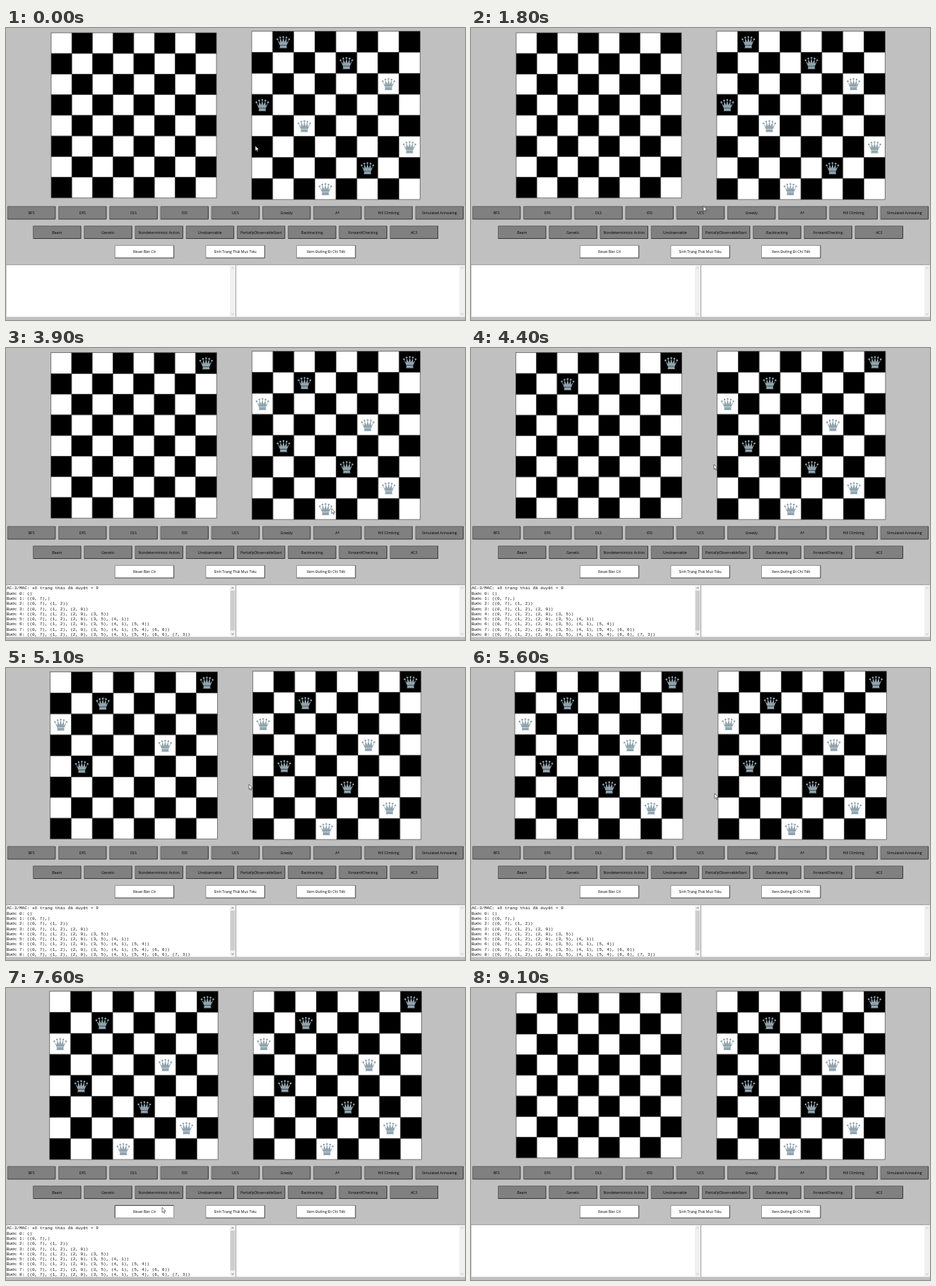
An HTML page that plays this animation: 650x414 px, repeating every 9200 ms.

```html
<!DOCTYPE html>
<html lang="vi">
<head>
<meta charset="utf-8">
<title>8 quân hậu</title>
<style>
  html, body { margin: 0; width: 100%; height: 100%; overflow: hidden; background: #c0c0c0; }
  svg { display: block; width: 100vw; height: 100vh; }
  .label { font: 5.2px "Open Sans", "Noto Sans", sans-serif; text-anchor: middle; fill: #000; }
  .log { font: 6.02px "Liberation Mono", "Courier New", monospace; fill: #111; white-space: pre; }
</style>
</head>
<body>
<svg id="stage" viewBox="0 0 650 414">
  <defs>
    <g id="queen" fill="#90a4ae">
      <path d="M-8.3-3.6-5.1 4H5.1L8.3-3.6 4.9.8 4.3-6 1.7.2 0-7 -1.7.2 -4.3-6 -4.9.8Z"/>
      <path d="M-5.2 4.5H5.2L4.5 6.4 5.4 8.4H-5.4L-4.5 6.4Z"/>
      <circle cx="-8.2" cy="-4" r="1.3"/><circle cx="-4.4" cy="-6.5" r="1.3"/>
      <circle cy="-7.3" r="1.3"/>
      <circle cx="4.4" cy="-6.5" r="1.3"/><circle cx="8.2" cy="-4" r="1.3"/>
    </g>
  </defs>
</svg>
<script>
const LOOP = 9200, TICK = 100;
const EMPTY = 29.25, FILLED = 29.8;
const FIRST = [1, 4, 6, 0, 2, 7, 5, 3];
const GOAL = [7, 2, 0, 5, 1, 4, 6, 3];
const NEW_GOAL = 2500, SOLVE = 3600, STEP = 285, STEP_START = 3555, RESET = 7800;

const stage = document.getElementById('stage');

function add(parent, tag, attrs = {}, text) {
  const node = document.createElementNS('http://www.w3.org/2000/svg', tag);
  set(node, attrs);
  if (text !== undefined) node.textContent = text;
  parent.appendChild(node);
  return node;
}

function set(node, attrs) {
  for (const key in attrs) node.setAttribute(key, attrs[key]);
}

const rect = (parent, x, y, width, height, fill) =>
  add(parent, 'rect', { x, y, width, height, fill });

// Rows and columns that hold a queen are slightly larger.
function makeBoard() {
  const group = add(stage, 'g');
  const cells = [], queens = [];
  for (let i = 0; i < 64; i++) {
    const dark = ((i >> 3) + i) % 2;
    cells.push(add(group, 'rect', {
      fill: dark ? '#000' : '#fff', stroke: '#484848', 'stroke-width': 0.7
    }));
  }
  for (let i = 0; i < 8; i++) queens.push(add(group, 'use', { href: '#queen' }));

  return (cols, cx, cy) => {
    const edges = (count, isFilled, center) => {
      const list = [0];
      for (let i = 0; i < count; i++) list.push(list[i] + (isFilled(i) ? FILLED : EMPTY));
      const shift = center - list[count] / 2;
      return list.map(v => v + shift);
    };
    const xs = edges(8, c => cols.includes(c), cx);
    const ys = edges(8, r => r < cols.length, cy);
    cells.forEach((cell, i) => {
      const c = i % 8, r = i >> 3;
      set(cell, { x: xs[c], y: ys[r], width: xs[c + 1] - xs[c], height: ys[r + 1] - ys[r] });
    });
    queens.forEach((queen, r) => {
      const c = cols[r], shown = c !== undefined;
      queen.style.display = shown ? '' : 'none';
      if (shown) set(queen, {
        transform: `translate(${(xs[c] + xs[c + 1]) / 2} ${(ys[r] + ys[r + 1]) / 2 + 0.4})`
      });
    });
    return xs[8] - xs[0];
  };
}

function makeButton(text, x, y, w, h, fill, light) {
  rect(stage, x, y, w, h, fill);
  const edge = d => add(stage, 'path', { d, fill: 'none', 'stroke-width': 0.9 });
  const top = edge(`M${x} ${y + h}V${y}H${x + w}`);
  const bottom = edge(`M${x} ${y + h}H${x + w}V${y}`);
  add(stage, 'text', { class: 'label', x: x + w / 2, y: y + h / 2 + 1.9 }, text);
  return pressed => {
    set(top, { stroke: pressed ? '#222' : light });
    set(bottom, { stroke: pressed ? light : '#2c2c2c' });
  };
}

function makeRow(names, x, y, pitch, w, h, fill, light) {
  return names.map((name, i) => {
    const paint = makeButton(name, x + i * pitch, y, w, h, fill, light);
    paint(false);
    return paint;
  });
}

function makePanel(x, w) {
  rect(stage, x, 336, w, 73.5, '#fff');
  add(stage, 'path', { d: `M${x} 409.5V335.8H${x + w}`, fill: 'none', stroke: '#888', 'stroke-width': 0.7 });
  const bar = x + w - 8;
  rect(stage, bar, 336.3, 8, 73, '#f0f0f0');
  const arrows = add(stage, 'path', {
    d: `M${bar + 2.4} 341.2l1.6-1.8 1.6 1.8M${bar + 2.4} 404.6l1.6 1.8 1.6-1.8`,
    fill: 'none', 'stroke-width': 0.8
  });
  const thumb = rect(stage, bar + 0.8, 344, 6.4, 56.5, '#cdcdcd');
  return active => {
    set(arrows, { stroke: active ? '#505050' : '#b4b4b4' });
    thumb.style.display = active ? '' : 'none';
  };
}

function makeLog() {
  const group = add(stage, 'g', { class: 'log' });
  const lines = ['AC-3/MAC: số trạng thái đã duyệt = 9'];
  for (let n = 0; n <= 8; n++) {
    const pairs = GOAL.slice(0, n).map((c, r) => `(${r}, ${c})`).join(', ');
    lines.push(`Bước ${n}: (${pairs}${n === 1 ? ',' : ''})`);
  }
  lines.forEach((line, i) => add(group, 'text', { x: 0.9, y: 342.4 + i * 7.28 }, line));
  return group;
}

const drawLeft = makeBoard(), drawRight = makeBoard();
makeRow(['BFS', 'DFS', 'DLS', 'IDS', 'UCS', 'Greedy', 'A*', 'Hill Climbing', 'Simulated Annealing'],
  2.4, 253, 72.22, 67.4, 18, '#808080', '#5c5c5c');
const solvers = makeRow(['Beam', 'Genetic', 'Nondeterministic Action', 'Unobservable',
  'PartiallyObservableStart', 'Backtracking', 'ForwardChecking', 'AC3'],
  38.6, 280.8, 72.22, 67.4, 17.7, '#808080', '#5c5c5c');
const actions = makeRow(['Reset Bàn Cờ', 'Sinh Trạng Thái Mục Tiêu', 'Xem Đường Đi Chi Tiết'],
  154.3, 308.3, 128.6, 83.4, 17.7, '#fff', '#8a8a8a');
const setScroll = makePanel(0, 325);
makePanel(325.6, 324.4)(false);
const log = makeLog();
const cursor = add(stage, 'path', {
  d: 'M0 0V7.2L1.7 5.7 2.8 8.3 4 7.8 2.9 5.3H5.2Z',
  fill: '#fff', stroke: '#111', 'stroke-width': 0.55
});

// time, x, y
const path = [
  [0, 353, 167], [200, 353, 167], [600, 320, 160], [1600, 320, 160], [2000, 338, 345],
  [2100, 338, 345], [2300, 325, 318], [2500, 325, 318], [2700, 399, 232], [2800, 399, 232],
  [3000, 410, 225], [3400, 578, 290], [3600, 578, 290], [4200, 344, 165], [5200, 344, 165],
  [5600, 345, 178], [5800, 342, 243], [6400, 232, 322], [6800, 221, 311], [7800, 221, 311],
  [8200, 235, 412]
];

function cursorAt(t) {
  const i = path.findIndex(p => p[0] > t);
  if (i < 0) return null;
  const [a, b] = [path[i - 1], path[i]];
  const k = (t - a[0]) / (b[0] - a[0]);
  const e = k * k * (3 - 2 * k);
  return [a[1] + (b[1] - a[1]) * e, a[2] + (b[2] - a[2]) * e];
}

const between = (t, from, to) => t >= from && t < to;

function render(time) {
  const t = Math.floor((time % LOOP) / TICK) * TICK;
  const solved = between(t, SOLVE, RESET);
  const count = solved ? Math.min(8, Math.floor((t - STEP_START) / STEP)) : 0;

  const width = drawLeft(GOAL.slice(0, count), 181, 123.9);
  drawRight(t < NEW_GOAL ? FIRST : GOAL, 467.2 + (width - 8 * EMPTY) / 2, 123.9);

  log.style.display = solved ? '' : 'none';
  setScroll(solved);
  actions[0](between(t, 7600, RESET));
  actions[1](between(t, 2400, NEW_GOAL));
  solvers[7](between(t, 3500, SOLVE));

  const pos = cursorAt(t);
  cursor.style.display = pos ? '' : 'none';
  if (pos) set(cursor, { transform: `translate(${pos[0]} ${pos[1]})` });
}

const start = performance.now();
function frame() {
  render(performance.now() - start);
  requestAnimationFrame(frame);
}
frame();
</script>
</body>
</html>
```
